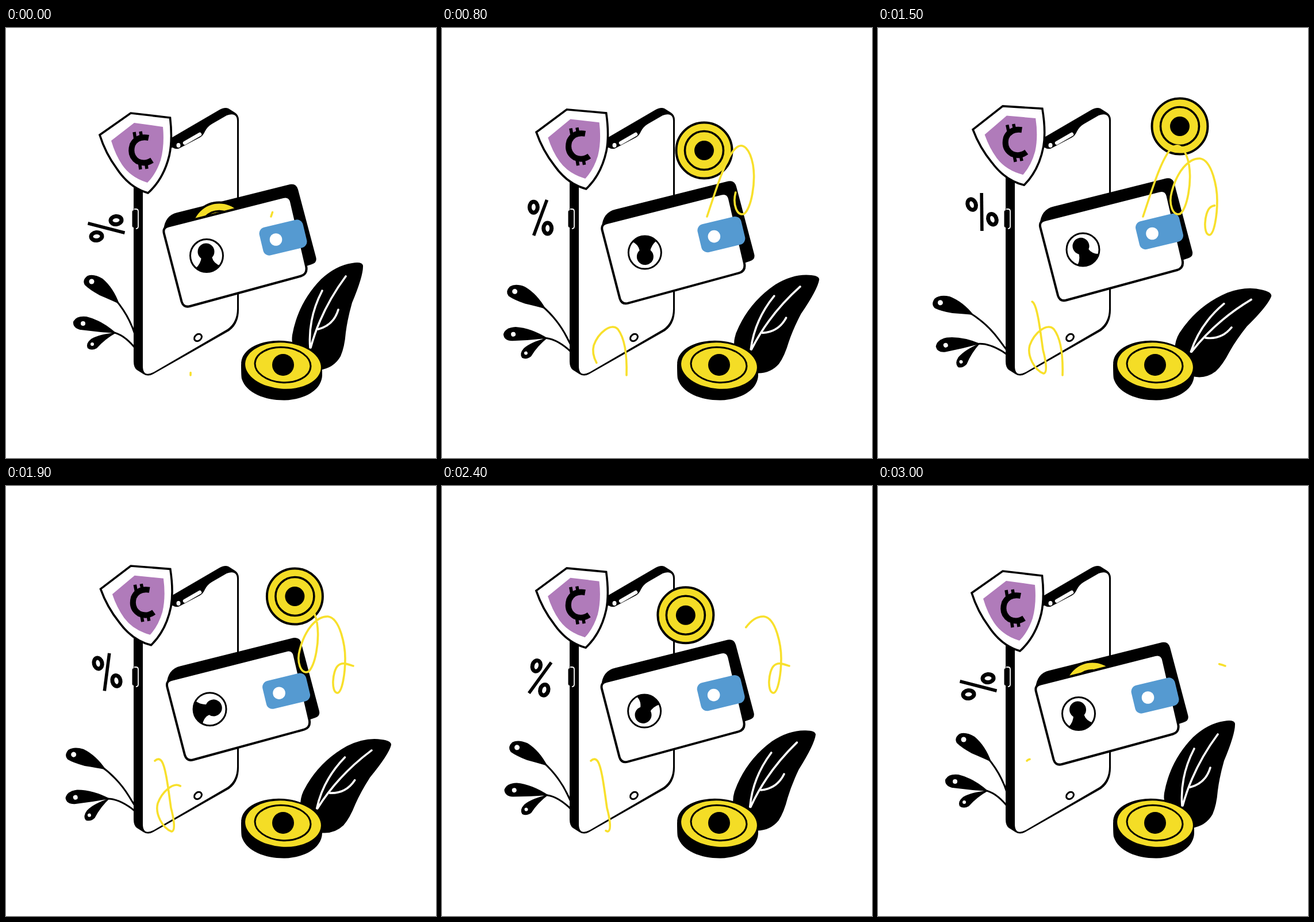
Write an HTML page that moves like this. It is 748 px wide and 748 px high and loops after 3100 ms.

```html
<!DOCTYPE html>
<html lang="en">
<head>
<meta charset="utf-8">
<title>Mobile wallet</title>
<style>
  html, body { margin: 0; width: 100%; height: 100%; overflow: hidden; background: #fff; }
  svg { display: block; width: 100vw; height: 100vh; }
  .w { fill: #fff; }
  .y { fill: #f4dd26; }
  .line { fill: none; stroke: #000; stroke-width: 3; stroke-linecap: round; }
  .vein { fill: none; stroke: #fff; stroke-width: 3.6; stroke-linecap: round; }
  .swirl { fill: none; stroke: #f8e02c; stroke-width: 3.6; stroke-linecap: round; }
</style>
</head>
<body>
<svg viewBox="0 0 748 748">
  <defs>
    <clipPath id="disc"><circle r="28"/></clipPath>
  </defs>

  <g id="plant">
    <path class="line" d="M190 472Q214 500 225 535T238 572M184 529Q204 532 224 556L238 575"/>
    <path d="M197 480Q187 452 168 436Q153 427 142 431Q132 438 137 447Q145 455 163 465Q182 473 197 480Z"/>
    <path d="M192 531Q166 508 140 502Q122 500 117 511Q116 522 130 525Q160 529 192 531Z"/>
    <path d="M192 530Q163 532 148 541Q138 549 142 557Q149 562 158 557Q172 541 192 530Z"/>
    <g class="w"><circle cx="149" cy="441" r="4.5"/><circle cx="134" cy="514" r="4"/><circle cx="150" cy="550" r="3"/></g>
  </g>

  <g id="phone">
    <path d="M222 250Q222 230 238 220L370 143Q380 137 387 140L398 147Q405 151 405 160L405 490Q405 515 388 527L256 602Q247 607 239 602L228 595Q222 591 222 580Z"/>
    <path class="w" d="M238 245L282 209L290 208Q296 212 302 209L338 190Q343 187 346 180Q350 172 358 167L384 152Q402 146 402 162V488Q402 512 385 524L258 598Q238 609 238 588Z"/>
    <path d="M311 200L337 185" stroke="#fff" stroke-width="6.5" stroke-linecap="round"/>
    <ellipse class="w" cx="300" cy="204" rx="3.5" ry="4"/>
    <rect x="219.500" y="317" width="8" height="30" rx="3"/>
    <path d="M223 315H226Q230 315 230 319V345Q230 349 226 349" fill="none" stroke="#fff" stroke-width="1.800"/>
    <ellipse class="line" cx="334" cy="538.500" rx="7" ry="5.5" transform="rotate(-40 334 538.5)"/>
  </g>

  <g id="shield">
    <path class="w" stroke="#000" stroke-width="3.6" d="M163 186L217 148L285.500 156Q290 195 284 222Q274 263 247 287Q215 278 193 245Q173 218 163 186Z"/>
    <path fill="#b07bba" d="M183 196L223 165L273 172Q276 205 269 230Q261 254 246 269Q217 260 202 238Q190 220 183 196Z"/>
    <path fill="none" stroke="#000" stroke-width="10" d="M248 191Q228 187 220 203Q214 222 229 232Q242 238 254 230"/>
    <path stroke="#000" stroke-width="5.500" d="M223 181L225 194M234 180L236 192M232 232L234 246M243 231L245 245"/>
  </g>

  <g id="percent">
    <path stroke="#000" stroke-width="5.600" d="M-32 -8.200L32 8.200"/>
    <g fill="none" stroke="#000" stroke-width="7">
      <ellipse rx="9.500" ry="7" transform="translate(17 -13.500) rotate(-6)"/>
      <ellipse rx="9.500" ry="7" transform="translate(-17 14.500) rotate(-6)"/>
    </g>
  </g>

  <g id="back">
    <path d="M274 352Q276 326 298 321L494 272Q505 270 508 281L539 398Q542 408 532 411L520 415L400 400Z"/>
  </g>
  <g id="coin">
    <circle class="y" r="48.500" stroke="#000" stroke-width="4"/>
    <circle class="line" r="33.500" style="stroke-width:3.6"/>
    <circle r="17"/>
  </g>
  <g id="front">
    <path class="w" stroke="#000" stroke-width="4" d="M275 358Q272 347 283 344.500L482 294Q493 291 496 302L522 414Q525 428 513 431.500L320 484Q309 487 305.500 476Z"/>
    <rect x="-39" y="-25" width="78" height="50" rx="11" fill="#559ad1" transform="translate(482 364.500) rotate(-13.500)"/>
    <circle class="w" cx="469.500" cy="368" r="10.800"/>
    <g transform="translate(349 396)">
      <g id="avatar" clip-path="url(#disc)">
        <circle cx="-1" cy="-7" r="14.500"/>
        <path d="M-9 2Q-10 14 -19 22L-10 32H18L25 18Q12 14 9 2Z"/>
      </g>
      <circle class="line" r="28.500"/>
    </g>
  </g>

  <g id="leaf">
    <path d="M621 413Q619 406 602 409Q574 413 548 437Q508 478 498 534Q496 548 501 562L512 580L545 595Q570 592 582 571Q589 555 591 530Q594 506 602 478Q622 430 621 413Z"/>
    <path class="vein" d="M550 457Q525 505 529 556M591 432Q548 490 530 556M578 490Q570 517 543 524"/>
  </g>

  <g id="floorCoin">
    <path d="M409 585Q409 606 410 610C418 636 452 648 485 647.500C520 646 549 630 550 604V588Z"/>
    <ellipse cx="479.500" cy="586.500" rx="70.500" ry="42.500" transform="rotate(4 479.500 586.500)"/>
    <ellipse class="y" cx="482" cy="587.500" rx="66" ry="40" transform="rotate(4 482 587.500)"/>
    <ellipse class="line" cx="481.500" cy="586" rx="48.500" ry="30.500" transform="rotate(4 481.500 586)"/>
    <circle cx="482" cy="586" r="19"/>
  </g>

  <path class="swirl" pathLength="1" d="M461 328C474 290 492 228 510 210C524 196 536 212 541 238C546 270 538 312 526 323C513 329 505 306 511 285C520 250 540 226 560 227C582 230 590 280 590 300C590 325 585 360 576 360C565 358 568 322 577 313C584 306 592 309 604 313"/>
  <path class="swirl" pathLength="1" d="M321 604C322 570 318 540 306 524C294 512 272 530 264 552C259 570 272 595 288 601C296 600 291 575 287 560C282 525 278 490 271 479C267 473 262 475 259 478"/>
</svg>
<script>
const LOOP = 3100, STEP = 100;
const times = [0, 400, 800, 1500, 2200, 2600, 3000];
const keys = {
  sway: [0, .25, .515, 1, .55, .288, 0],
  spin: [0, 90, 184, 338, 515, 616, 716],
  head: [.013, .243, .507, .97, 1, 1, 1],
  tail: [0, 0, 0, 0, .443, .712, .983],
  coinX: [371, 398, 456, 525, 466, 383, 373],
  coinY: [352, 278, 213, 171, 216, 244, 354],
  pctX: [174.5, 171.5, 171, 180.5, 171, 171.5, 174.5],
  pctY: [348, 340, 330, 320, 329, 339, 348],
  pctTurn: [0, -41, -84, -105, -83.5, -48, 0]
};
const el = id => document.getElementById(id);
const swirls = document.querySelectorAll('.swirl');

function segment(t) {
  let i = 0;
  while (i < times.length - 2 && t >= times[i + 1]) i++;
  return i;
}

function linear(v, t) {
  const i = segment(t);
  return v[i] + (v[i + 1] - v[i]) * (t - times[i]) / (times[i + 1] - times[i]);
}

// Cubic Hermite through the keys, for parts that curve or ease
function smooth(v, t) {
  const i = segment(t), span = times[i + 1] - times[i], u = (t - times[i]) / span;
  const slope = k => {
    const a = Math.max(k - 1, 0), b = Math.min(k + 1, times.length - 1);
    return (v[b] - v[a]) / (times[b] - times[a]) * span;
  };
  const w = u * u * (3 - 2 * u);
  return v[i] * (1 - w) + v[i + 1] * w
    + slope(i) * u * (1 - u) ** 2 - slope(i + 1) * u * u * (1 - u);
}

function place(id, transform) {
  el(id).setAttribute('transform', transform);
}

function draw(t) {
  const at = name => linear(keys[name], t), ease = name => smooth(keys[name], t);
  const p = at('sway');
  const lift = `translate(${7.5 * p} ${-10.5 * p})`;
  place('back', lift);
  place('front', lift);
  place('shield', `translate(${3.5 * p} ${-12.6 * p}) rotate(${-3 * p} 225 215)`);
  place('plant', `rotate(${-18.8 * p} 240 582)`);
  place('leaf', `rotate(${22.6 * p} 519 598)`);
  place('avatar', `rotate(${at('spin')})`);
  place('coin', `translate(${ease('coinX')} ${ease('coinY')})`);
  place('percent', `translate(${ease('pctX')} ${ease('pctY')}) rotate(${ease('pctTurn')})`);
  const head = t > 1500 ? Math.min(1, .97 + (t - 1500) / 1500) : at('head');
  const tail = at('tail');
  for (const s of swirls) {
    s.setAttribute('stroke-dasharray', `${head - tail} 2`);
    s.setAttribute('stroke-dashoffset', -tail);
  }
}

const start = performance.now();
function tick() {
  const t = (performance.now() - start) % LOOP;
  draw(Math.floor(t / STEP) * STEP);
  requestAnimationFrame(tick);
}
tick();
</script>
</body>
</html>
```
